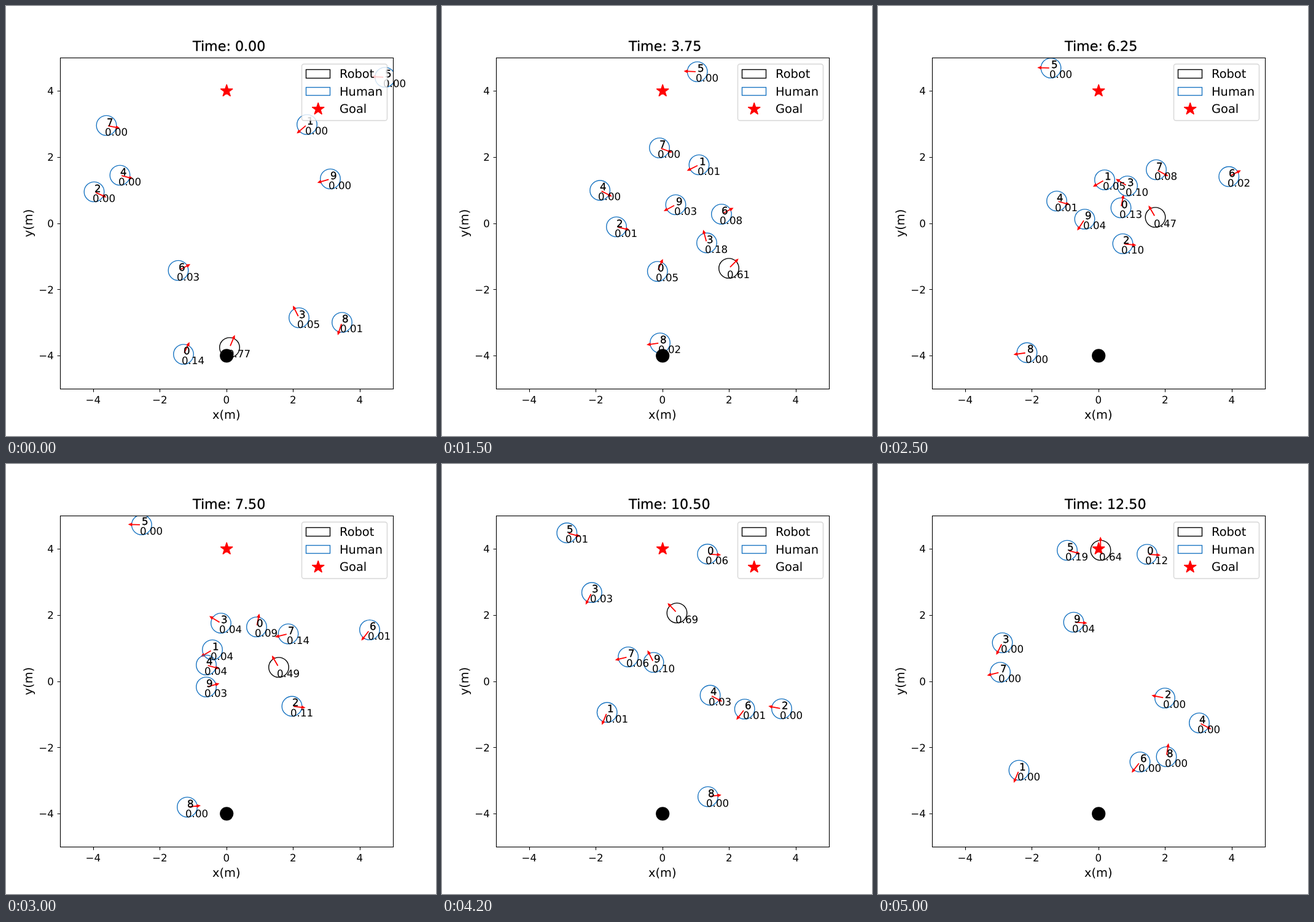
An HTML page that plays this animation: 700 px wide and 700 px high, repeating every 5100 ms.

```html
<!DOCTYPE html>
<html lang="en">
<head>
<meta charset="utf-8">
<title>Crowd navigation</title>
<style>
  html, body { margin: 0; width: 100%; height: 100%; overflow: hidden; background: #fff; }
  svg { display: block; width: 700px; height: 700px; }
  text { font-family: "DejaVu Sans", sans-serif; font-size: 16.67px; text-rendering: geometricPrecision; white-space: pre; }
  .mid { text-anchor: middle; }
  .end { text-anchor: end; }
  .label { font-size: 19.44px; }
  .title { font-size: 22.22px; }
  .title, .id { stroke: #000; stroke-width: .3; }
  .line { fill: none; stroke: #000; stroke-width: 1.11; }
  .robot, .human { fill: none; stroke: #000; stroke-width: 1.39; }
  .human { stroke: #1a75c2; }
  .arrow, .star { fill: red; stroke: red; stroke-width: 1.39; }
  .arrow { stroke-width: 1.8; }
  .star { stroke-linejoin: bevel; }
</style>
</head>
<body>
<svg viewBox="0 0 700 700">
  <clipPath id="plot"><rect x="87.5" y="84" width="542.5" height="539"/></clipPath>
  <g id="bodies" clip-path="url(#plot)"></g>
  <g id="axes">
    <circle cx="359.2" cy="569.3" r="11.1"/>
    <rect class="line" x="88.5" y="84.5" width="542" height="539"/>
    <text class="label mid" x="358.75" y="672">x(m)</text>
    <text class="label mid" transform="translate(43.3 353.5) rotate(-90)">y(m)</text>
  </g>
  <g id="labels"><text class="title" id="clock" x="304" y="73"></text></g>
  <g id="legend">
    <rect x="481.5" y="94.5" width="139" height="92" rx="3.5" fill="#fff" stroke="#ccc" stroke-width="1.39" opacity=".8"/>
    <rect class="robot" x="488.5" y="103.5" width="39" height="14"/>
    <rect class="human" x="488.5" y="132.5" width="39" height="13"/>
    <text class="label" x="543" y="117">Robot</text>
    <text class="label" x="543" y="146">Human</text>
    <text class="label" x="543" y="174">Goal</text>
  </g>
</svg>
<script>
const $ = id => document.getElementById(id);

function add(parent, tag, attrs, text = '') {
  const el = document.createElementNS('http://www.w3.org/2000/svg', tag);
  for (const k in attrs) el.setAttribute(k, attrs[k]);
  el.textContent = text;
  return $(parent).appendChild(el);
}

function star(parent, x, y) {
  const pts = [...Array(10).keys()].map(i => {
    const r = i % 2 ? 3.97 : 10.4, a = i * Math.PI / 5;
    return [x + r * Math.sin(a), y - r * Math.cos(a)];
  });
  add(parent, 'polygon', { class: 'star', points: pts.join(' ') });
}

star('axes', 359.2, 138.2);
star('legend', 508.2, 167.8);

for (let v = -4; v <= 4; v += 2) {
  const x = 358.75 + 54.25 * v, y = 353.5 - 53.9 * v;
  const name = String(v).replace('-', '\u2212');
  add('axes', 'path', { class: 'line', d: `M${Math.round(x) + .5} 623.5v4.9M88.5 ${Math.round(y) + .5}h-4.9` });
  add('axes', 'text', { class: 'mid', x, y: 647 }, name);
  add('axes', 'text', { class: 'end', x: 77.8, y: Math.round(y + 6.3) }, name);
}

const STEP = 100, COUNT = 51, REACH = 45;
const agents = [];

// Each waypoint is [step, x, y]; legs between them are straight
function agent(id, ...path) {
  agents.push({
    path,
    ring: add('bodies', 'ellipse', { class: id ? 'human' : 'robot', rx: 16.28, ry: 16.17 }),
    arrow: add('bodies', 'path', { class: 'arrow', d: 'M2.8 0H20M16.5 -1.6L20 0L16.5 1.6Z' }),
    id: add('labels', 'text', { class: 'id' }, id),
    value: add('labels', 'text', {})
  });
}

agent('', [0, 364, 556], [2, 374, 532], [8, 427.5, 494.5], [9, 440, 499.5], [15, 467, 427], [18, 493, 401],
  [25, 451.5, 344], [35, 436.5, 318], [36, 441, 306], [42, 382.5, 242.5], [44, 364, 223], [50, 362.5, 140.5]);
agent('0', [0, 289, 567], [8, 319.5, 504.5], [25, 395.5, 328.5], [35, 420.5, 202], [39, 430, 146.5], [50, 438, 147]);
agent('1', [0, 490, 193], [8, 447, 230.5], [15, 418.5, 258.5], [25, 369, 283], [35, 303, 322], [50, 229.5, 498.5]);
agent('2', [0, 143.5, 302.5], [8, 212, 333], [15, 284, 359.5], [25, 398.5, 387], [37.5, 566, 405.5],
  [41, 564, 404], [42, 553, 398.5], [50, 467, 381]);
agent('3', [0, 477, 507.5], [8, 448.5, 450.5], [25, 406, 293], [39, 249, 198], [41, 249, 199], [50, 202.5, 291]);
agent('4', [0, 185.5, 275.5], [8, 233.5, 288], [25, 291, 317.5], [35, 361, 337], [50, 523, 421.5]);
agent('5', [0, 617, 116], [25, 281.5, 101], [36, 148, 96.5], [38, 151, 98], [50, 308, 140.5]);
agent('6', [0, 280.5, 430.5], [27, 594.5, 265.5], [30, 592, 270], [50, 426.5, 485]);
agent('7', [0, 163.5, 194.5], [15, 354, 231], [25, 453, 266.5], [26.5, 467, 274], [29.5, 466, 275], [50, 199, 339]);
agent('8', [0, 547, 515], [1, 543, 527], [8, 449, 535.5], [15, 355, 548.5], [25.4, 238, 565],
  [35, 357, 551.5], [44.5, 460, 538], [50, 469.5, 476.5]);
agent('9', [0, 528, 281.5], [8, 454.5, 303], [15, 380.5, 323.5], [25, 336.5, 347], [30, 326, 363],
  [35, 335.5, 360.5], [42, 344.5, 323], [48.5, 311, 257], [50, 318.5, 257.5]);

// Position on the current leg, facing the direction of travel
function pose(path, n) {
  let i = 0;
  while (i < path.length - 2 && path[i + 1][0] <= n) i++;
  const [t, x, y] = path[i], [t2, x2, y2] = path[i + 1];
  const s = (n - t) / (t2 - t), dx = x2 - x, dy = y2 - y;
  return { x: x + dx * s, y: y + dy * s, angle: Math.atan2(dy, dx) * 180 / Math.PI };
}

function move(el, x, y, turn = 0) {
  el.setAttribute('transform', `translate(${x} ${y}) rotate(${turn})`);
}

function draw(n) {
  $('clock').textContent = `Time: ${(n / 4).toFixed(2)}`;
  const poses = agents.map(a => pose(a.path, n));
  // Attention fades with distance from the robot and sums to one
  const scores = poses.map(p => Math.exp(-Math.hypot(p.x - poses[0].x, p.y - poses[0].y) / REACH));
  const total = scores.reduce((a, b) => a + b);
  agents.forEach(({ ring, arrow, id, value }, i) => {
    const { x, y, angle } = poses[i];
    move(ring, x, y);
    move(arrow, x, y, angle);
    move(id, Math.round(x), Math.round(y));
    move(value, Math.round(x - 2.7), Math.round(y + 16.2));
    value.textContent = (scores[i] / total).toFixed(2);
  });
}

const start = performance.now();
let shown = -1;
function tick() {
  const n = Math.floor((performance.now() - start) / STEP) % COUNT;
  if (n !== shown) draw(shown = n);
  requestAnimationFrame(tick);
}
tick();
</script>
</body>
</html>
```
